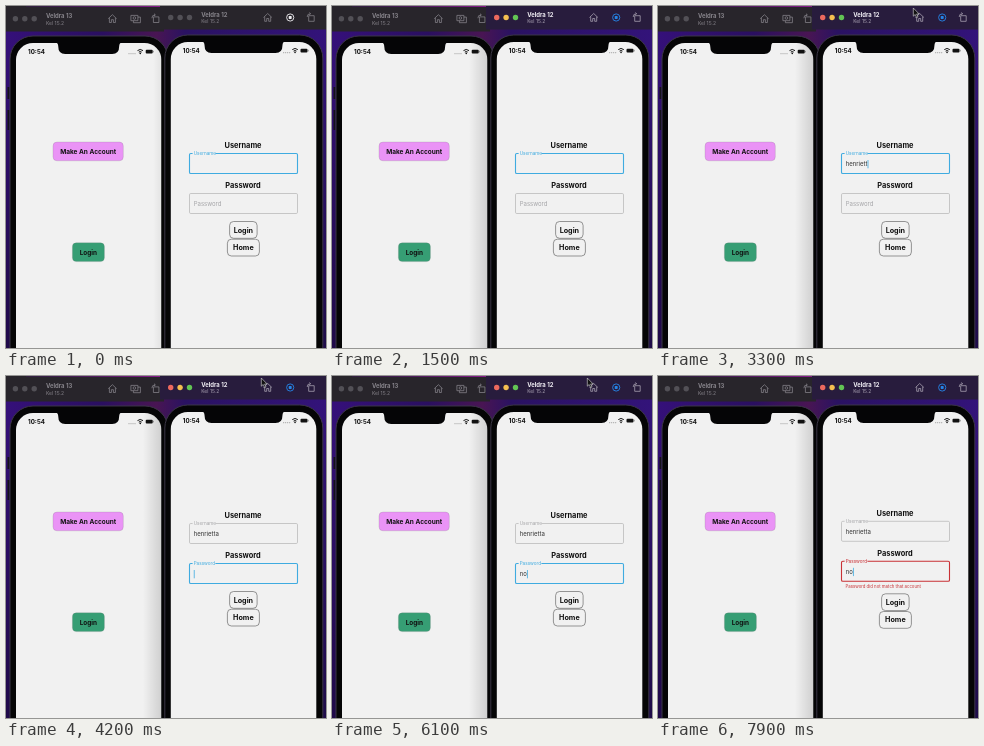
An HTML page that plays this animation: 320x342 px, repeating every 8000 ms.

```html
<!DOCTYPE html>
<html lang="en">
<head>
<meta charset="utf-8">
<title>Login demo on two phones</title>
<style>
  html, body { margin: 0; width: 100%; height: 100%; overflow: hidden; background: #201038; }
  svg { display: block; width: 100vw; height: 100vh; font-family: Inter, Roboto, "Open Sans", sans-serif; }
</style>
</head>
<body>
<svg id="stage" viewBox="0 0 320 342" preserveAspectRatio="none">
  <defs>
    <linearGradient id="desk">
      <stop offset="0" stop-color="#35107a"/><stop offset=".3" stop-color="#2a0f60"/>
      <stop offset=".47" stop-color="#491553"/><stop offset=".56" stop-color="#2a1262"/>
      <stop offset="1" stop-color="#33137a"/>
    </linearGradient>
    <linearGradient id="dim" x1="0" y1="0" x2="0" y2="1">
      <stop offset="0" stop-color="#000" stop-opacity="0"/><stop offset="1" stop-color="#000" stop-opacity=".4"/>
    </linearGradient>
    <linearGradient id="glow">
      <stop offset="0" stop-color="#4a1470" stop-opacity=".3"/><stop offset="1" stop-color="#8a1c8c"/>
    </linearGradient>
    <linearGradient id="shade">
      <stop offset="0" stop-color="#000" stop-opacity="0"/><stop offset="1" stop-color="#000" stop-opacity=".14"/>
    </linearGradient>
  </defs>
</svg>
<script>
const NS = 'http://www.w3.org/2000/svg';
const stage = document.getElementById('stage');
const LOOP = 8000, USER = 'henrietta';
const BLUE = '#3fabe0', RED = '#c93236', GREY = '#bcbcbc', PAPER = '#f1f1f1';
const BAR = '#28252b', DOT = '#525056', FADED = '#87848b';

function add(parent, tag, attrs, text) {
  const el = document.createElementNS(NS, tag);
  set(el, attrs);
  if (text !== undefined) el.textContent = text;
  parent.append(el);
  return el;
}
function set(el, attrs) {
  for (const k in attrs) el.setAttribute(k, attrs[k]);
}
const group = (parent, x = 0, y = 0) => add(parent, 'g', { transform: `translate(${x} ${y})` });
const rect = (parent, x, y, width, height, fill, more) =>
  add(parent, 'rect', { x, y, width, height, fill, ...more });
const label = (parent, x, y, size, text, more) =>
  add(parent, 'text', { x, y, 'font-size': size, fill: '#111', ...more }, text);
const line = (parent, d, more) =>
  add(parent, 'path', { d, fill: 'none', 'stroke-width': .75, 'stroke-linejoin': 'round', ...more });
const centred = { 'text-anchor': 'middle', 'font-weight': 650 };

function phone(x, y, notch) {
  const g = group(stage, x, y);
  rect(g, -6, -7, 158, 380, '#050506', { rx: 23, stroke: '#3b3646', 'stroke-width': 1 });
  rect(g, 0, 0, 145.5, 370, PAPER, { rx: 17 });
  const half = notch / 2;
  add(g, 'path', {
    transform: 'translate(72.7 0)', fill: '#050506',
    d: `M${-half - 3}-1H${half + 3}Q${half} 0 ${half} 3Q${half} 11 ${half - 7} 11H${7 - half}Q${-half} 11 ${-half} 3Q${-half} 0 ${-half - 3}-1Z`
  });
  label(g, 12, 11.2, 6.2, '10:54', { 'font-weight': 650 });
  for (let i = 0; i < 4; i++) add(g, 'circle', { cx: 113 + i * 2, cy: 10.7, r: .45, fill: '#444' });
  line(g, 'M121.5 7.6Q124.2 5.3 127 7.6M122.8 9.1Q124.2 7.9 125.7 9.1', { stroke: '#111', 'stroke-width': 1 });
  add(g, 'circle', { cx: 124.25, cy: 10.4, r: .8, fill: '#111' });
  rect(g, 129.7, 6.7, 7, 3.8, '#111', { rx: 1 });
  rect(g, 137.1, 7.8, .6, 1.6, '#666');
}

function titleBar(x, y, name) {
  const g = group(stage, x, y);
  const dots = [0, 9.4, 18.8].map(cx => add(g, 'circle', { cx, cy: 0, r: 2.7, fill: DOT }));
  const title = label(g, 30.5, -.9, 5.9, name, { 'font-weight': 650, fill: FADED });
  const sub = label(g, 30.5, 5.9, 5, 'Kel 15.2', { fill: FADED });
  const icons = add(g, 'g', { stroke: FADED });
  line(icons, 'M92.8 0L97 -4L101.2 0M94 -.8V3.8H96V1H98V3.8H100V-.8');
  line(icons, 'M138 -1.8H143.5V3.8H138ZM136.5 -.5Q136.3 -3.8 139.8 -3.8M138.6 -5L139.9 -3.8L138.6 -2.7');
  return { g, dots, title, sub, icons };
}

// desktop
rect(stage, 0, 0, 320, 342, 'url(#desk)');
rect(stage, 0, 30, 320, 312, 'url(#dim)');

// left window
rect(stage, 0, 0, 158, 25.5, BAR);
rect(stage, 20, 0, 134, 1, 'url(#glow)');
const leftBar = titleBar(9.4, 12.7, 'Veldra 13');
line(leftBar.icons, 'M115.5 -3.3H122.5V2H115.5ZM118 2V4H125V-1.6H122.5');
add(leftBar.icons, 'circle', { cx: 119, cy: -.7, r: 1.3, fill: 'none', 'stroke-width': .7 });
rect(stage, 1.5, 81, 2, 12, '#15121a');
rect(stage, 1.5, 104, 2, 20, '#15121a');
phone(10, 37, 61);
const rim = { rx: 4, stroke: '#777', 'stroke-opacity': .35, 'stroke-width': .6 };
rect(stage, 47, 136, 70.3, 18.8, '#ea93f6', rim);
label(stage, 82.2, 147.9, 6.5, 'Make An Account', centred);
rect(stage, 66.4, 236.8, 32, 18.8, '#369e74', rim);
label(stage, 82.3, 248.6, 6.4, 'Login', centred);

// right window
const softShade = rect(stage, 147, 38, 8.5, 304, 'url(#shade)', { opacity: .4 });
const deepShade = rect(stage, 137, 38, 18.5, 304, 'url(#shade)');
rect(stage, 155.5, 50, 9, 292, '#050506');
phone(164.8, 36, 78);
const barBack = rect(stage, 154, 0, 166, 23.5, BAR);
const rightBar = titleBar(164.7, 11.5, 'Veldra 12');
const ring = add(rightBar.g, 'circle', { cx: 119.5, cy: 0, r: 3.6, fill: 'none', 'stroke-width': .9 });
const core = rect(rightBar.g, 118, -1.5, 3, 3, '#fff', { rx: .7 });

function field(top, name) {
  const g = group(stage);
  label(g, 237, top - 6, 7.4, name, centred);
  const box = rect(g, 183.5, top - .5, 108, 20, 'none', { rx: 1.3 });
  const gap = rect(g, 186.6, top - 1.5, 22.8, 2, PAPER);
  const tag = label(g, 187.7, top + 1.1, 4.6, name);
  const value = label(g, 187.7, top + 12.4, 6, '', { fill: '#333' });
  const caret = rect(g, 188, top + 6, .8, 8.3, BLUE);
  return { g, top, box, gap, tag, value, caret };
}
const user = field(148, 'Username');
const pass = field(188, 'Password');

function outlined(parent, x, y, w, text) {
  rect(parent, x, y, w, 16.8, PAPER, { rx: 4, stroke: '#555', 'stroke-width': .6 });
  label(parent, x + w / 2, y + 11, 7.2, text, centred);
}
const buttons = group(stage);
outlined(buttons, 223.6, 215.5, 27.5, 'Login');
outlined(buttons, 221.4, 233.2, 32, 'Home');
const error = label(stage, 187.5, 211.5, 4.3, 'Password did not match that account', { fill: RED });

const popup = rect(stage, 175, 134.5, 26, 13.5, '#cfcfd1', { rx: 3.5 });
const pointer = add(stage, 'path', {
  d: 'M255.3 2V10.2L257.2 8.5L258.6 11.5L260 10.9L258.6 8H261.2Z',
  fill: '#111', stroke: '#ddd', 'stroke-width': .6
});

const userKeys = [1900, 2100, 2400, 2600, 2700, 2900, 3000, 3200, 3500];
const passKeys = [5500, 5800];
const FOCUS = 600, TAB = 4000, FAIL = 7100;
const ramp = (t, a, b) => Math.max(0, Math.min(1, (t - a) / (b - a)));
const typed = (text, keys, t) => text.slice(0, keys.filter(k => k <= t).length);

function drawField(f, text, focused, color, lift, caret) {
  f.value.textContent = text;
  set(f.box, { stroke: color, 'stroke-width': focused ? 1.1 : .8 });
  set(f.tag, {
    y: f.top + 12.3 - 11.2 * lift, 'font-size': 6 - 1.4 * lift,
    fill: color === GREY ? '#a5a5a8' : color
  });
  set(f.gap, { opacity: lift });
  const end = text ? f.value.getComputedTextLength() : 0;
  set(f.caret, { x: 187.8 + end, opacity: focused ? caret : 0 });
}

function draw(t) {
  const active = t >= FOCUS, failed = t >= FAIL, onPass = t >= TAB;
  set(barBack, { fill: active ? '#281c3d' : BAR });
  const lights = active ? ['#ed695e', '#f4bf50', '#62c454'] : [DOT, DOT, DOT];
  rightBar.dots.forEach((d, i) => set(d, { fill: lights[i] }));
  set(rightBar.title, { fill: active ? '#f3f0f6' : FADED });
  set(rightBar.sub, { fill: active ? '#aaa3b3' : FADED });
  set(rightBar.icons, { stroke: active ? '#aca6b5' : FADED });
  const record = active ? '#2585e8' : '#f0eff2';
  set(ring, { stroke: record });
  set(core, { fill: record });
  set(deepShade, { opacity: ramp(t, FOCUS, 900) });
  set(softShade, { opacity: active ? 0 : .4 });

  let caret = ramp(t, 100, 300);
  if (t > 1200 && t < 1900) caret = 1 - ramp(t, 1250, 1400) + ramp(t, 1550, 1700);
  drawField(user, typed(USER, userKeys, t), !onPass, onPass ? GREY : BLUE, 1, caret);
  drawField(pass, typed('no', passKeys, t), onPass, failed ? RED : onPass ? BLUE : GREY, ramp(t, TAB, TAB + 150), 1);

  const up = failed ? 'translate(0 -2.2)' : '';
  set(user.g, { transform: up });
  set(pass.g, { transform: up });
  set(buttons, { transform: failed ? 'translate(0 2.3)' : '' });
  set(error, { opacity: failed ? 1 : 0 });
  set(popup, { opacity: t < 2000 ? 0 : .8 * (1 - ramp(t, 2250, 2500)) });
  set(pointer, { opacity: t >= 1900 && t < 6500 ? 1 : 0 });
}

const start = performance.now();
function tick() {
  draw((performance.now() - start) % LOOP);
  requestAnimationFrame(tick);
}
tick();
</script>
</body>
</html>
```
